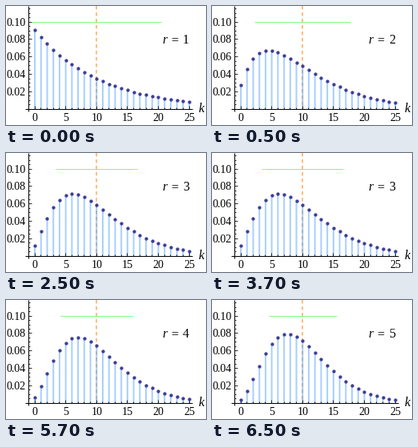
These frames come from a looping animation (250x149 px, 8 s). A matplotlib script:

```python
from math import comb, sqrt

import matplotlib.pyplot as plt
import numpy as np
from matplotlib.animation import FuncAnimation

WIDTH, HEIGHT, DPI = 250, 149, 100
PX = 72 / DPI  # points per pixel
INTERVAL, FRAMES = 500, 16
CHANGES = (1, 5, 9, 13)  # steps at which r goes up by one
MEAN = 10
K = np.arange(26)
BASE = 129.2


def sx(k):
    return 36.05 + 7.72 * k


def sy(p):
    return BASE - 1090 * p


def negative_binomial(r):
    p = r / (r + MEAN)
    return np.array([comb(int(k) + r - 1, int(k)) * p**r * (1 - p)**k for k in K])


fig = plt.figure(figsize=(WIDTH / DPI, HEIGHT / DPI), dpi=DPI, facecolor="white")
ax = fig.add_axes([0, 0, 1, 1])
ax.set(xlim=(0, WIDTH), ylim=(HEIGHT, 0))
ax.axis("off")


def line(xs, ys, color="black", width=1, **style):
    style.setdefault("solid_capstyle", "butt")
    return ax.plot(xs, ys, color=color, lw=width * PX, **style)[0]


def label(x, y, text, size=14, **style):
    return ax.text(x, y, text, fontsize=size * PX, family="Liberation Serif", **style)


def draw_axes():
    axis_x = sx(-1)
    line([axis_x, axis_x], [0, 132.2], zorder=4)
    line([24.2, 233.2], [BASE, BASE], zorder=4)
    # Whole coordinates snap to the centre of their pixel.
    for k in range(-1, 26):
        x, major = int(sx(k)), k % 5 == 0
        line([x, x], [BASE, BASE - (4 if major else 2)], width=0.8, zorder=4)
        if major:
            label(sx(k), 144, str(k), ha="center")
    for i in range(1, 24):
        y, major = int(sy(i * 0.005)), i % 4 == 0
        line([axis_x, axis_x + (4 if major else 2)], [y, y], width=0.8, zorder=4)
        if major:
            label(25, y + 5, f"{i * 0.005:.2f}", ha="right")
    label(240.5, 133, "k", 16, style="italic")


draw_axes()
line([sx(MEAN)] * 2, [0, BASE], (1, 0.5, 0), 2, alpha=0.5, zorder=1,
     dashes=(2.25, 1.75), dash_capstyle="butt")
stems = ax.vlines(sx(K), BASE, BASE, color=(0.32, 0.63, 1), lw=2 * PX,
                  alpha=0.5, zorder=2, snap=False)
spread = line([], [], (0.5, 1, 0.5), zorder=3)
dots = line([], [], (0.247, 0.24, 0.6), ls="none", marker="o", ms=4.3 * PX,
            mew=0, zorder=5, snap=False)
label(195.5, 47, "r", 16, style="italic")
label(206.5, 47, "=", 16)
r_value = label(221, 47, "", 16)


def update(step):
    r = 1 + sum(step >= change for change in CHANGES)
    xs, ys = sx(K), sy(negative_binomial(r))
    stems.set_segments([[(x, BASE), (x, y)] for x, y in zip(xs, ys)])
    dots.set_data(xs, ys)
    deviation = sqrt(MEAN + MEAN**2 / r)
    spread.set_data([sx(MEAN - deviation), sx(MEAN + deviation)], [sy(0.1)] * 2)
    r_value.set_text(str(r))
    return stems, dots, spread, r_value


animation = FuncAnimation(fig, update, frames=FRAMES, interval=INTERVAL,
                          repeat=True, repeat_delay=0)
plt.show()
```
